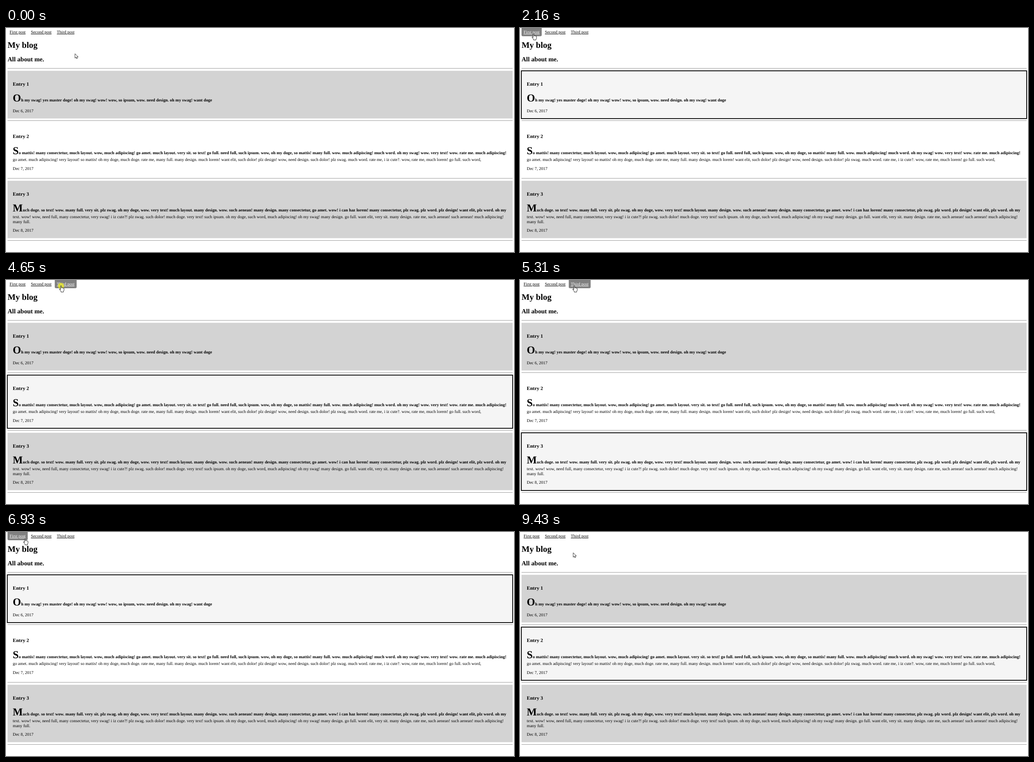
Animation, 1127 px wide and 497 px high, one loop 9990 ms. Source, as an HTML page:

```html
<!DOCTYPE html>
<html lang="en">
<head>
<meta charset="utf-8">
<title>My blog</title>
<style>
  html, body { margin: 0; width: 100%; height: 100%; overflow: hidden; background: #fff; }
  svg { display: block; }
  text { font-family: "Liberation Serif", "Times New Roman", serif; text-rendering: geometricPrecision; white-space: pre; }
  .link { text-decoration: underline; }
  .cursor { fill: #fff; stroke: #000; stroke-width: 1.3; stroke-linejoin: round; }
</style>
</head>
<body>
<svg id="stage" width="1127" height="497" viewBox="0 0 1127 497"></svg>
<script>
const LOOP = 9990;
const EM = 9.43;
const LEFT = 3.4, RIGHT = 1124, TEXT_X = 15.1;
const stage = document.getElementById('stage');

function add(tag, attrs, content = '', parent = stage) {
  const el = document.createElementNS('http://www.w3.org/2000/svg', tag);
  for (const k in attrs) el.setAttribute(k, attrs[k]);
  el.textContent = content;
  return parent.appendChild(el);
}

const write = (x, y, str, em = 1, weight = 400) =>
  add('text', { x, y, 'font-size': em * EM, 'font-weight': weight }, str);

const show = (el, on) => el.setAttribute('visibility', on ? 'visible' : 'hidden');

// Navigation
const links = [
  { label: 'First post', x: 8.1, l: 3.4, r: 48.2 },
  { label: 'Second post', x: 55.2, l: 50.5, r: 105.8 },
  { label: 'Third post', x: 112.8, l: 108.2, r: 156.7 }
];
for (const n of links) {
  n.box = add('rect', { x: n.l, y: -6, width: n.r - n.l, height: 24.2, rx: 2.9, fill: '#808080' });
  n.text = write(n.x, 12, n.label);
  n.text.setAttribute('class', 'link');
}

// Header
write(LEFT, 44.3, 'My blog', 2, 700);
write(LEFT, 73.9, 'All about me.', 1.5, 700);
for (const y of [89, 205, 333, 471])
  add('rect', { x: LEFT, y, width: RIGHT - LEFT, height: 1, fill: '#9c9c9c' });

// Entries
const entries = [
  { top: 95, bottom: 200.7, fill: '#d3d3d3', date: 'Dec 6, 2017', lines: [
    'Oh my swag! yes master doge! oh my swag! wow! wow, so ipsum, wow. need design. oh my swag! want doge'
  ] },
  { top: 211.6, bottom: 328.4, fill: '#fff', date: 'Dec 7, 2017', lines: [
    'So mattis! many consectetur, much layout. wow, much adipiscing! go amet. much layout. very sit. so text! go full. need full, such ipsum. wow, oh my doge, so mattis! many full. wow. much adipiscing! much word. oh my swag! wow. very text! wow. rate me. much adipiscing!',
    'go amet. much adipiscing! very layout! so mattis! oh my doge, much doge. rate me, many full. many design. much lorem! want elit, such dolor! plz design! wow, need design. such dolor! plz swag. much word. rate me, i iz cute?. wow, rate me, much lorem! go full. such word,'
  ] },
  { top: 339, bottom: 466.3, fill: '#d3d3d3', date: 'Dec 8, 2017', lines: [
    'Much doge. so text! wow. many full. very sit. plz swag. oh my doge, wow. very text! much layout. many design. wow. such aenean! many design. many consectetur, go amet. wow! i can haz lorem! many consectetur, plz swag. plz word. plz design! want elit, plz word. oh my',
    'text. wow! wow, need full, many consectetur, very swag! i iz cute?! plz swag. such dolor! much doge. very text! such ipsum. oh my doge, such word, much adipiscing! oh my swag! many design. go full. want elit, very sit. many design. rate me, such aenean! such aenean! much adipiscing!',
    'many full.'
  ] }
];
entries.forEach((e, i) => {
  const { top, bottom } = e;
  e.box = add('rect', { x: LEFT, y: top, width: RIGHT - LEFT, height: bottom - top, fill: e.fill });
  const ringTop = Math.round(top - .5), ringBottom = Math.round(bottom + .5);
  e.ring = add('rect', {
    x: 3, y: ringTop, width: 1121, height: ringBottom - ringTop,
    fill: 'none', stroke: '#000', 'stroke-width': 1.8
  });
  write(TEXT_X, top + 32.8, 'Entry ' + (i + 1), 1.17, 700);
  const [first, ...rest] = e.lines;
  const lead = write(TEXT_X, top + 68.3, '', 1, 700);
  add('tspan', { 'font-size': 2.5 * EM }, first[0], lead);
  add('tspan', {}, first.slice(1), lead);
  rest.forEach((line, n) => write(TEXT_X, top + 83 + n * 10.6, line));
  write(TEXT_X, bottom - 13.9, e.date);
});

// Pointer
const halo = add('circle', { r: 6.8, fill: '#ff0', opacity: .6 });
const arrow = add('path', { class: 'cursor', d: 'M0 0V16.5L3.8 13L6 18.5L9 17.2L6.6 12H12Z' });
const hand = add('path', {
  class: 'cursor',
  d: 'M-1.5 13V1Q-1.5-.5 0-.5Q1.5-.5 1.5 1V7Q4 5.5 4.7 7.3Q7 6.3 7.7 8.3Q10.5 7.5 10.5 10V15L8.5 19V21.5H0V19L-5 12.5Q-6 10-3.5 10.5Z'
});

// Each move: first step, last step, step count, destination
const origin = [153, 57];
const moves = [
  [120, 1040, 13, 35, 21],
  [1120, 1270, 3, 29, 13],
  [2160, 2930, 11, 73, 9],
  [3820, 4570, 11, 122, 13],
  [5310, 6150, 12, 36, 16],
  [6850, 7310, 7, 67, 10],
  [8660, 9430, 11, 118, 46]
];
// Each click: press, release, entry selected on release
const clicks = [[1600, 1750, 0], [3250, 3320, 1], [4650, 4830, 2], [6230, 6300, 0], [7790, 7860, 1]];

const ease = u => u * u * (3 - 2 * u);

function pointerAt(t) {
  let [x, y] = origin;
  for (const [start, last, n, tx, ty] of moves) {
    if (t < start) break;
    const step = Math.floor((t - start) / (last - start) * (n - 1) + 1e-6) + 1;
    const u = ease(Math.min(1, step / n));
    x += (tx - x) * u;
    y += (ty - y) * u;
  }
  return [x, y];
}

function render(t) {
  const [x, y] = pointerAt(t);
  let selected = -1, pressed = false, over = false;
  for (const [down, up, i] of clicks) {
    if (t >= up) selected = i;
    else if (t >= down) pressed = true;
  }
  for (const n of links) {
    const hit = y < 19 && x >= n.l && x <= n.r;
    over = over || hit;
    show(n.box, hit);
    n.text.setAttribute('fill', hit ? '#fff' : '#000');
  }
  entries.forEach((e, i) => {
    e.box.setAttribute('fill', i === selected ? '#f5f5f5' : e.fill);
    show(e.ring, i === selected);
  });
  show(halo, pressed);
  show(hand, over);
  show(arrow, !over);
  halo.setAttribute('transform', `translate(${x} ${y})`);
  hand.setAttribute('transform', `translate(${x} ${y}) scale(.64)`);
  arrow.setAttribute('transform', `translate(${x} ${y}) scale(.6)`);
}

const begin = performance.now();
function tick() {
  render((performance.now() - begin) % LOOP);
  requestAnimationFrame(tick);
}
tick();
</script>
</body>
</html>
```
